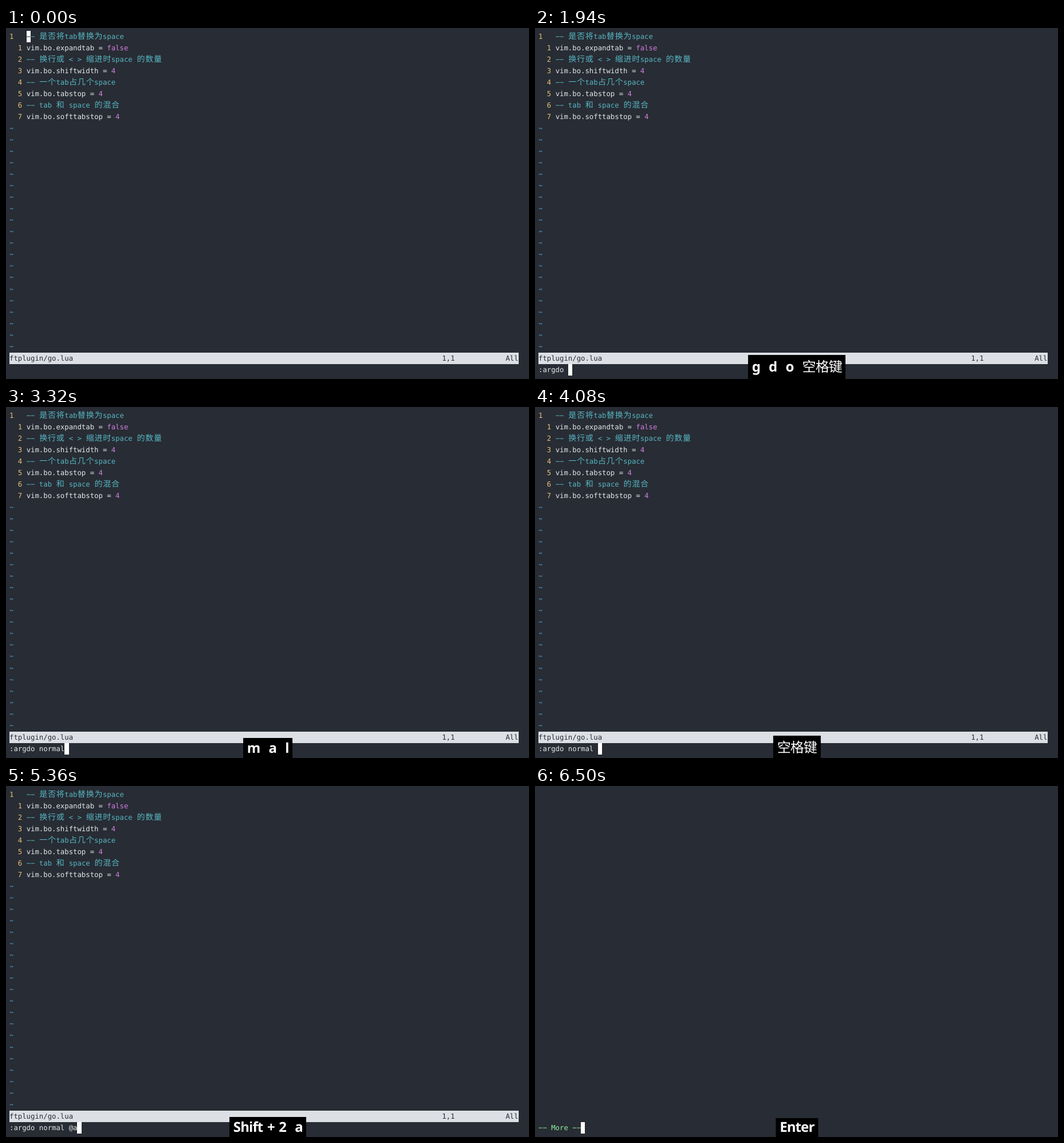
An HTML page that plays this animation: 913x613 px, repeating every 6.84 s.

```html
<!DOCTYPE html>
<html lang="zh">
<head>
<meta charset="utf-8">
<title>argdo normal</title>
<style>
  html, body { margin: 0; width: 100%; height: 100%; overflow: hidden; background: #282c34; }
  #stage { position: absolute; left: 0; top: 0; width: 913px; height: 613px; overflow: hidden; }
  .row {
    position: absolute; left: 6px; height: 20.07px; white-space: pre;
    font: 12.3px/20.07px "DejaVu Sans Mono", monospace; color: #e4e6ea;
    text-rendering: geometricPrecision; font-variant-ligatures: none;
  }
  .han {
    position: relative; left: .4px; letter-spacing: .8px;
    font: 14px/0 "Noto Sans CJK SC", "Noto Sans CJK", sans-serif;
  }
  .num { color: #e5c07b; }
  .note { color: #56b6c2; }
  .val { color: #d07fe0; }
  .tilde { color: #61b8f2; font-family: "Noto Sans Mono", monospace; }
  .more { color: #90ee9c; }
  .status { width: 888.6px; background: #dcdfe4; color: #282c34; }
  .cursor { display: inline-block; width: 7.4px; height: 20.07px; vertical-align: top; background: #fff; color: #282c34; }
  #keys {
    position: absolute; left: 457.3px; transform: translateX(-50%);
    box-sizing: border-box; padding: 0 6.5px; background: #000; color: #fff; white-space: pre;
    font: 700 24px/2px "Noto Sans", "Open Sans", sans-serif;
    letter-spacing: -.9px; word-spacing: 2.2px; text-rendering: geometricPrecision;
  }
  .key-han { font: 500 24px/0 "Noto Sans CJK SC", "Noto Sans CJK", sans-serif; }
</style>
</head>
<body>
<div id="stage">
  <div id="editor"></div>
  <div id="command"></div>
  <div id="keys"></div>
</div>
<script>
const LOOP = 6840, ROW = 20.07, TOP = 5, HEIGHT = 613;
const CURSOR = '<span class="cursor"></span>';
const MORE = 'more';

const code = [
  '−− 是否将tab替换为space',
  'vim.bo.expandtab = false',
  '−− 换行或 < > 缩进时space 的数量',
  'vim.bo.shiftwidth = 4',
  '−− 一个tab占几个space',
  'vim.bo.tabstop = 4',
  '−− tab 和 space 的混合',
  'vim.bo.softtabstop = 4',
];

// [start in ms, text]; a null command means the cursor is still in the buffer
const commandTrack = [
  [0, null], [500, ':'], [1070, ':a'], [1170, ':ar'], [1430, ':arg'], [1620, ':argd'],
  [1680, ':argdo'], [1850, ':argdo '], [3030, ':argdo n'], [3170, ':argdo normal'],
  [4080, ':argdo normal '], [5160, ':argdo normal @'], [5360, ':argdo normal @a'], [6200, MORE],
];
const keyTrack = [
  [0, ''], [230, 'Shift'], [430, 'Shift + ;'], [980, 'Shift + ;  a'], [1260, 'Shift + ;  a  r'],
  [1330, 'a  r'], [1430, 'a  r  g'], [1520, 'r  g  d'], [1760, 'r  g  d  o'],
  [1850, 'r  g  d  o  空格键'], [1940, 'g  d  o  空格键'], [2230, 'd  o  空格键'],
  [2510, 'o  空格键'], [2580, '空格键'], [2830, ''], [2930, 'n'], [3170, 'r  m  a  l'],
  [3320, 'm  a  l'], [3700, 'l'], [3860, ''], [4020, '空格键'], [4780, '空格键  Shift'],
  [4890, 'Shift'], [5090, 'Shift + 2'], [5300, 'Shift + 2  a'], [5980, 'a'],
  [6050, 'a  Enter'], [6500, 'Enter'],
];

const $ = id => document.getElementById(id);
const span = (cls, text) => `<span class="${cls}">${text}</span>`;
const wrapHan = (text, cls) => text.replace(/[\u4e00-\u9fff]+/g, han => span(cls, han));
const row = (n, html, cls = '') =>
  `<div class="row ${cls}" style="top:${TOP + n * ROW}px">${html}</div>`;
const at = (track, t) => track.findLast(([start]) => start <= t)[1];

function highlight(line) {
  const html = line.replace(/</g, '&lt;').replace(/>/g, '&gt;');
  return line.startsWith('−')
    ? span('note', wrapHan(html, 'han'))
    : html.replace(/(false|\d)$/, value => span('val', value));
}

function editorHtml(cursorInBuffer) {
  const lines = code.map((line, i) => {
    const number = i ? `  ${i} ` : '1   ';
    let body = highlight(line);
    if (!i && cursorInBuffer) body = body.replace('−', span('cursor', '−'));
    return row(i, span('num', number) + body);
  });
  for (let n = code.length; n < 28; n++) lines.push(row(n, '~', 'tilde'));
  const status = ('ftplugin/go.lua'.padEnd(102) + '1,1').padEnd(117) + 'All';
  return lines.join('') + row(28, status, 'status');
}

function showCommand(text) {
  $('editor').innerHTML = text === MORE ? '' : editorHtml(text === null);
  $('command').innerHTML =
    text === null ? '' :
    text === MORE ? row(29, '−− More −−' + CURSOR, 'more') :
    row(29, text + CURSOR);
}

// The key box hugs the ink: its height follows the tallest and lowest glyphs
function showKeys(text) {
  const box = $('keys');
  const drop = /g/.test(text) ? 13 : /[;键]/.test(text) ? 10 : 8;
  const rise = /键/.test(text) ? 29 : /[fdl]/.test(text) ? 27.5 : /E/.test(text) ? 25.5 : 21;
  box.innerHTML = wrapHan(text, 'key-han');
  box.style.display = text ? 'block' : 'none';
  box.style.top = HEIGHT - rise - drop + 'px';
  box.style.height = rise + drop + 'px';
  box.style.paddingTop = rise - 10.5 + 'px';
}

let origin, command, keys;
function frame(now) {
  origin ??= now;
  const t = (now - origin) % LOOP;
  const nextCommand = at(commandTrack, t), nextKeys = at(keyTrack, t);
  if (nextCommand !== command) showCommand(command = nextCommand);
  if (nextKeys !== keys) showKeys(keys = nextKeys);
  requestAnimationFrame(frame);
}
requestAnimationFrame(frame);
</script>
</body>
</html>
```
